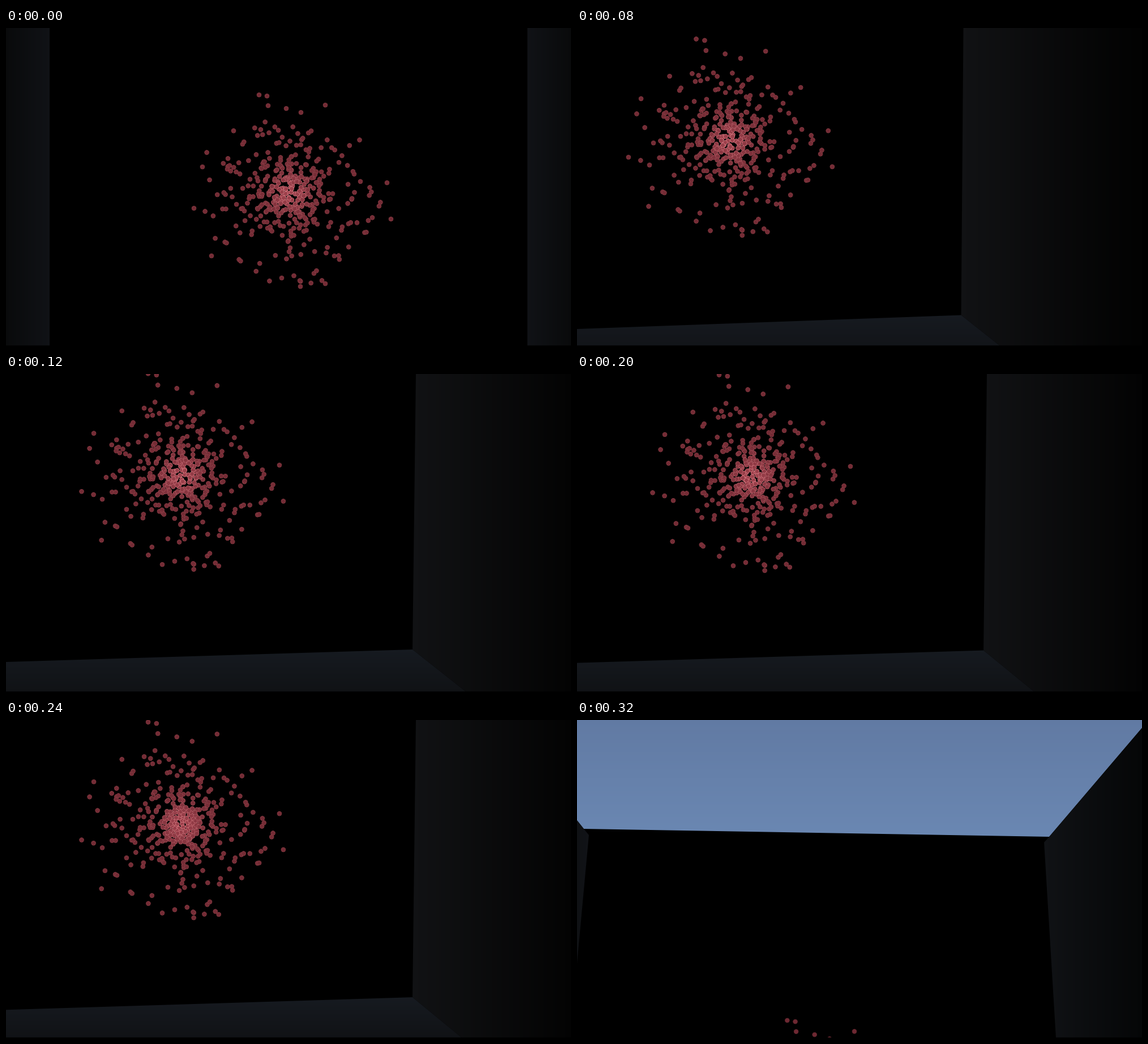
A matplotlib script that plays this animation: 998 by 561 pixels, repeating every 0.42 s.

```python
import numpy as np
import matplotlib.pyplot as plt
from matplotlib.animation import FuncAnimation
from matplotlib.collections import PathCollection
from matplotlib.patches import Polygon, Rectangle
from matplotlib.path import Path
from matplotlib.transforms import IdentityTransform

W, H, DPI = 998, 561, 64
PX = 72 / DPI  # one pixel in points
MID = np.array([W / 2, H / 2])
FOCAL = 1230
CENTER = np.array([501, 291])

# Camera keys, held as radians at 40 ms steps
KEYS = [0, 1, 3, 7, 8]
YAW = [0, 0.217, 0.1535, 0.1535, 0.06]
PITCH = [0, 0.058, 0.091, 0.091, -0.332]

# Stray particles that set the outline of the cloud
STRAYS = np.array([(447, 118), (461, 120), (463, 137), (495, 142), (521, 149),
                   (564, 136), (673, 273), (680, 337), (564, 451), (520, 456),
                   (487, 441), (363, 402), (332, 318), (347, 245)], float)


def ring(n, r0, r1, power=0.5):
    """Random points around the centre, radius r0 to r1."""
    r = r0 + (r1 - r0) * rng.random(n) ** power
    a = rng.uniform(0, 2 * np.pi, n)
    return CENTER + np.column_stack([r * np.cos(a), r * np.sin(a)])


rng = np.random.default_rng(14)
rim_dots = ring(60, 112, 165, 1.4)
high = rim_dots[:, 1] < 155
rim_dots[high, 1] = 2 * CENTER[1] - rim_dots[high, 1]
HALO = np.vstack([STRAYS, rim_dots, ring(82, 70, 120, 0.8),
                  ring(105, 36, 76, 0.8), ring(45, 10, 55)])
rng.shuffle(HALO)

k = np.arange(92)
golden = k * np.pi * (3 - np.sqrt(5))
PACKED = CENTER + (3.4 * np.sqrt(k + 0.5))[:, None] * np.column_stack(
    [np.cos(golden), np.sin(golden)])
LOOSE = CENTER + (PACKED - CENTER) * [1.15, 1.05] + rng.normal(0, 6.5, PACKED.shape)


def project(pts, yaw, pitch):
    """Turn the camera by yaw, then pitch, and return screen positions."""
    x, y = (pts - MID).T
    u = x * np.cos(yaw) - FOCAL * np.sin(yaw)
    z = x * np.sin(yaw) + FOCAL * np.cos(yaw)
    v = y * np.cos(pitch) - z * np.sin(pitch)
    depth = y * np.sin(pitch) + z * np.cos(pitch)
    return MID + FOCAL * np.column_stack([u, v]) / depth[:, None]


fig = plt.figure(figsize=(W / DPI, H / DPI), dpi=DPI, facecolor="black")
ax = fig.add_axes([0, 0, 1, 1])
ax.set_xlim(0, W)
ax.set_ylim(H, 0)
ax.axis("off")

# Each particle is a red disc followed by its pale wire lines
ang = np.linspace(0, 2 * np.pi, 11)
DISC = Path(4.0 * np.column_stack([np.cos(ang), np.sin(ang)]), closed=True)
spoke = np.radians(20 + 72 * np.arange(5))
tips = np.column_stack([np.cos(spoke), np.sin(spoke)])
WIRE = Path(np.hstack([tips, 3.7 * tips]).reshape(-1, 2),
            [Path.MOVETO, Path.LINETO] * 5)

balls = PathCollection([DISC, WIRE], sizes=[PX ** 2], offsets=np.zeros((2, 2)),
                       offset_transform=ax.transData, zorder=5)
balls.set_transform(IdentityTransform())
balls.set_linewidth([0.7 * PX, 0.6 * PX])
ax.add_collection(balls, autolim=False)
ax.add_patch(Rectangle((0, H - 1), W, 1, color="black", lw=0, zorder=9))
panes = []


def pane(pts, start, end, vertical=False):
    """Polygon filled with a linear gradient across its bounding box."""
    pts = np.array(pts, float)
    (x0, y0), (x1, y1) = pts.min(0), pts.max(0)
    t = np.linspace(0, 1, 256)[:, None]
    ramp = np.array(start) * (1 - t) + np.array(end) * t
    ramp = np.round(ramp).astype(np.uint8)
    img = ramp[:, None] if vertical else ramp[None]
    im = ax.imshow(img, extent=(x0, x1, y1, y0), aspect="auto",
                   interpolation="nearest", zorder=1)
    im.set_clip_path(Polygon(pts, transform=ax.transData))
    panes.append(im)


def draw_front():
    near, far = (16, 18, 22), (9, 10, 11)
    pane([(0, 0), (77, 0), (77, H), (0, H)], far, near)
    pane([(921, 0), (W, 0), (W, H), (921, H)], near, far)


def draw_corner(turn, fall, late):
    def mix(a, b):
        return a + (b - a) * turn
    top, cx = mix(641, 724), mix(639, 718)
    cy = mix(527, 486) + 0.7 * fall
    left = mix(554, 508) + 0.75 * fall
    foot = mix(682, 813) - 2.45 * late
    pane([(top, 0), (W, 0), (W, H), (foot, H), (cx, cy)],
         (17, 18, 20), [mix(0, 3)] * 3)
    pane([(0, left), (cx, cy), (foot, H), (0, H)],
         (22, 26, 32), (mix(20, 16), mix(23, 18), mix(28, 21)), True)


def draw_sky():
    pane([(0, 0), (W, 0), (W, 14), (834, 206), (12, 192), (0, 177)],
         (97, 122, 163), (106, 135, 178), True)
    pane([(0, 177), (12, 192), (21, 203), (0, 430)], (15, 17, 20), (17, 19, 23))
    pane([(W, 14), (834, 206), (825, 216), (846, H), (W, H)],
         (16, 18, 21), (5, 6, 7))


def paint_balls(world, pos, plain):
    """Place the particles; they glow near the centre unless plain."""
    dist = np.hypot(*(world - CENTER).T)
    glow = np.exp(-(dist / 34) ** 2)[:, None]
    if plain:
        face, rim, wire = (110, 40, 50), (98, 38, 46), (118, 46, 56)
    else:
        face = [110, 38, 48] + glow * [38, 16, 18]
        rim = [140, 62, 70] + glow * [92, 72, 72]
        wire = [166, 88, 95] + glow * [70, 62, 60]
    fill = np.zeros((2 * len(pos), 4))
    edge = np.ones_like(fill)
    fill[::2, :3] = np.array(face) / 255
    fill[::2, 3] = 1
    edge[::2, :3] = np.array(rim) / 255
    edge[1::2, :3] = np.array(wire) / 255
    edge[1::2, 3] = 0.6
    balls.set_offsets(np.repeat(pos, 2, axis=0))
    balls.set_facecolor(fill)
    balls.set_edgecolor(edge)


def update(i):
    step = min(i // 2, 8)  # the view changes every 40 ms, the last one holds
    while panes:
        panes.pop().remove()

    pack = min(step / 7, 1) ** 1.5
    world = np.vstack([HALO, LOOSE + (PACKED - LOOSE) * pack])
    pos = project(world, np.interp(step, KEYS, YAW), np.interp(step, KEYS, PITCH))

    if step == 0:
        draw_front()
    elif step < 8:
        late = max(step - 3, 0)
        fall = 0.3625 * late ** 2 + 0.375 * late
        draw_corner(min((step - 1) / 2, 1), fall, late)
        pos[:, 1] += fall
    else:
        draw_sky()
    paint_balls(world, pos, step == 8)
    return [balls, *panes]


anim = FuncAnimation(fig, update, frames=21, interval=20, repeat=True,
                     repeat_delay=0, blit=False)
plt.show()
```
